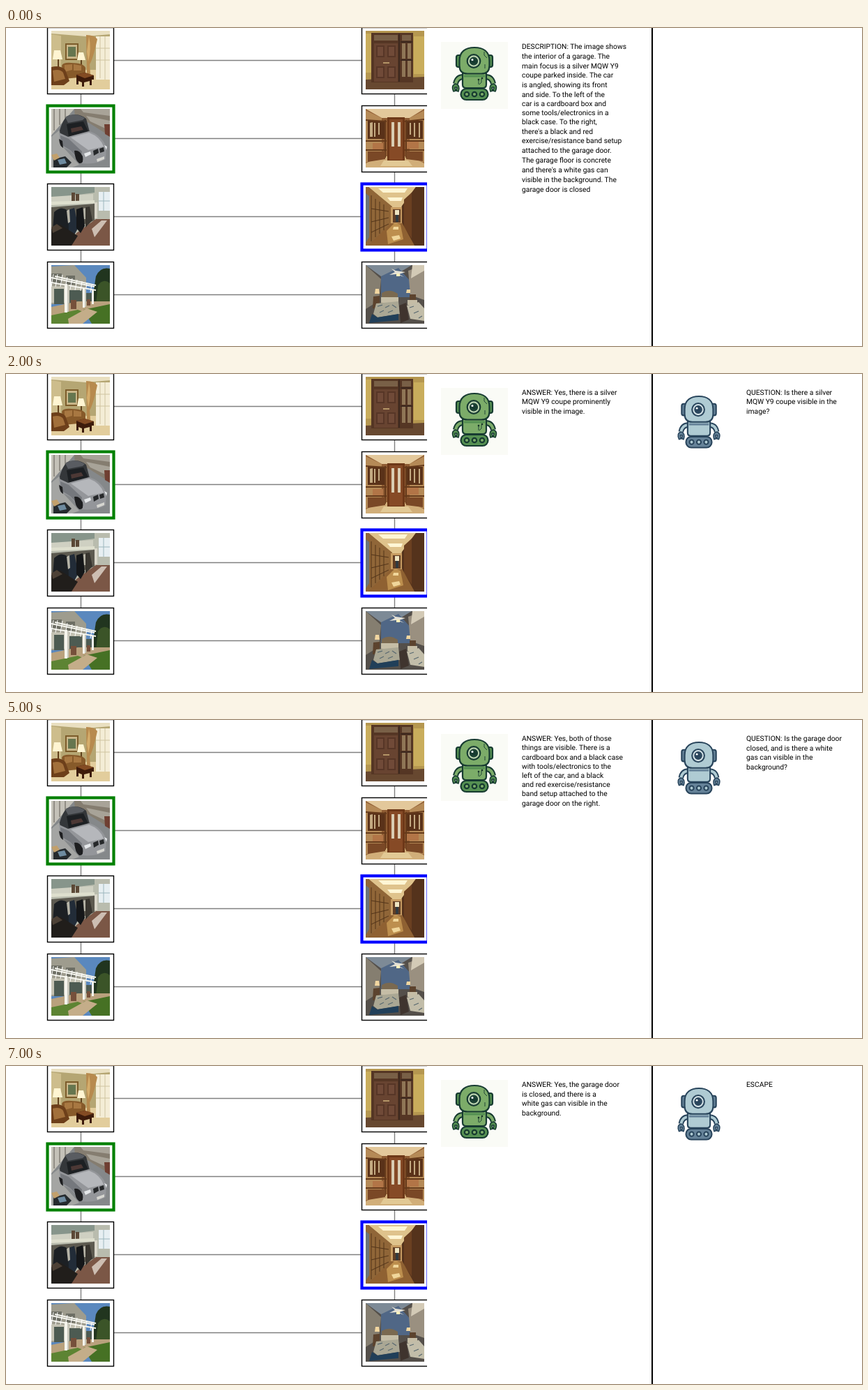
Recreate the animation shown at these times as an HTML page. Size 1228 by 456 pixels, loop 8 s.

```html
<!DOCTYPE html>
<html lang="en">
<head>
<meta charset="utf-8">
<title>Image dialogue</title>
<style>
html, body { margin: 0; width: 100%; height: 100%; overflow: hidden; background: #fff; }
svg { display: block; width: 1228px; height: 456px; }
text { font: 10.3px Roboto, Arial, sans-serif; text-rendering: geometricPrecision; fill: #000; }
</style>
</head>
<body>
<svg id="stage" viewBox="0 0 1228 456" xmlns="http://www.w3.org/2000/svg"></svg>
<script>
const stage = document.getElementById('stage');

// Scene lines: "fill path" or "stroke/width path", in an 84 x 84 square.
const living = `
#b5a673 M0 0H84V84H0Z
#e9dfc0 M0 0H84V5L50 8L0 4Z
#e2cd9c M0 66L40 56H84V84H0Z
#cdbd8c M0 5L14 7V60H0Z
#7c5c2a M20 18H39V42H20Z
#c9b689 M22 20H37V40H22Z
#66764f M24 23H35V37H24Z
#f4edd6 M64 8H84V70H64Z
#cfc4a0/1 M70 8V68M77 8V70M64 25H84M64 42H84
#b78a4e M50 6Q62 6 66 12Q60 40 55 48L56 62H51Z
#d5ad6b M54 8Q58 26 53 44L51 30Z
#fff5d2 M4 28H13L16 41H2Z
#fff5d2 M39 31H46L49 42H37Z
#60401c/2 M10 41V52M43 42V54
#875a2a M15 50Q17 45 29 46Q46 46 49 53V66L18 69Z
#a87842 M19 49L30 48V56L19 59ZM32 48L43 50V57H32Z
#6d3f1a M0 52Q13 49 20 56L26 72L18 78H0Z
#a2703b M2 57Q12 54 17 60L20 69L4 73Z
#3d1b0b M36 63L48 60L61 64V70L58 70V78H55V72L47 74V80H44V74L39 72V77H36Z
#834b23 M36 63L48 60L61 64L48 68Z`;

const garage = `
#85888a M0 0H84V84H0Z
#c4c1b8 M0 0H33L12 24L0 38Z
#857d70 M33 0H84V39L54 20L34 12Z
#a8a398 M42 0H84V10L46 5ZM50 10L84 17V31L56 18Z
#6f3f32 M76 22H84V40L77 36Z
#5f5b52/1 M4 0V31M12 0V23M20 0V16
#a4a5a3 M0 40L11 31L18 56L40 80L30 84H0Z
#34373a M12 31Q18 10 27 9Q41 6 50 14L55 33L24 44L14 46Z
#595c61 M20 12Q34 4 48 13L45 16L24 20Z
#1d2023 M22 22L46 18L53 32L25 40Z
#4c3835 M28 28L43 25L46 30L29 34Z
#94969a M11 34L24 40L54 32Q72 37 79 55L78 72Q66 80 43 78L27 60L13 53Z
#b5b7bb M28 41L54 34Q70 40 75 54L53 59Z
#75787d M13 38L25 43L44 61L42 74L27 59L14 51Z
#1d1e20 M33 60Q40 58 45 68Q47 79 40 78Q34 74 33 60ZM11 43L16 46L17 56Q12 54 11 43Z
#26282a M60 60L67 57L68 63L61 67ZM69 57L75 55L76 61L70 63Z
#e4e7e9 M47 64L56 61L57 65L49 69ZM76 52L80 54L79 59Z
#d6d6d0 M65 72L76 68V72L66 76Z
#252a2e M3 72L20 68L29 77L22 84H3Z
#c2a06c M0 66L8 64L12 70L4 74Z
#6e8ba0 M9 73L19 71L22 78L12 80Z`;

const mudroom = `
#b9bcae M0 0H84V84H0Z
#87958b M0 0H62V8L0 16Z
#cfd0c2 M0 14L60 10V24L0 25Z
#e7eff2 M68 7H84V34H68Z
#9cb6bd/1 M75 7V34M68 20H84
#5b4836 M29 8H34V20H29ZM35 10H40V20H35Z
#dedfce M0 21L62 19V23L0 26Z
#5d5a50 M0 29L62 24V48L0 70Z
#7b5746 M36 66L64 46H84V84H26Z
#cdbeb2 M58 60L72 48H80L62 72Z
#1c2024 M4 36Q14 26 24 34L27 70L16 84H0Z
#222c38 M24 33L33 30L39 58L31 72L25 65Z
#151719 M36 32L45 29L48 56L42 66L36 59Z
#38352f M49 29L55 28L59 48L49 58Z
#b6b4a7 M22 34L26 32L27 50L24 52ZM46 31L49 30V46H47Z
#211e1b M0 60L13 54L38 70L29 84H0Z
#4d4136 M0 58L8 53L16 59L2 66Z
#d9d6c9 M62 22H66V45H62Z`;

const pergola = `
#5a88be M0 0H84V84H0Z
#9e9c8e M0 2L33 0L50 18V56H0Z
#6d6e64 M0 12H15V27H0ZM21 15H34V28H21Z
#c4c2b3 M0 30L42 32V54H0Z
#4d5b52 M4 34H18V56H4ZM26 36H44V56H26ZM50 40H58V55H50Z
#21351f M64 16Q70 2 84 5V57H58L61 35Z
#3b5428 M67 29Q75 18 84 26V55H64Z
#b9a17d M0 60L38 52H84V62L37 75L0 78Z
#5d8433 M0 72L38 64L58 72L36 84H0Z
#467124 M46 64L84 56V84H58Z
#c4ad89 M24 77L51 62L66 67L45 84H25Z
#f5f5ed/2 M0 18L62 31M0 25L64 36M5 16L64 29
#fff/1 M3 13L0 31M9 13L6 31M16 14L13 31M23 17L20 33M30 19L27 35M37 21L34 36M44 23L42 37M51 26L49 38M58 28L56 39
#f5f4ec M19 27H23V68H19ZM45 33H48V61H45ZM58 35H61V56H58Z
#c7c6ba M23 28H25V67H23ZM48 34H50V60H48Z
#76503b M28 50H36V63H28ZM51 49H56V58H51Z`;

const door = `
#b59750 M0 0H84V84H0Z
#c9ad5c M0 4H8V60H0ZM69 8H84V62H69Z
#674830 M0 70L84 66V84H0Z
#553624 M8 3H68V74H8Z
#796047 M12 6H46V14H12ZM52 6H65V14H52Z
#684431 M12 18H46V73H12Z
#573627 M15 21H27V38H15ZM31 21H43V38H31ZM15 51H27V68H15ZM31 51H43V68H31Z
#704a38 M17 23H25V36H17ZM33 23H41V36H33ZM17 53H25V66H17ZM33 53H41V66H33Z
#b49567 M25 45H34V47H25Z
#8f7656 M52 18H57V40H52ZM60 18H65V40H60ZM52 43H57V66H52ZM60 43H65V66H60Z
#3d291f/2 M48 4V73M50 16H67M50 42H67`;

const closet = `
#8f5c33 M0 0H84V84H0Z
#e3c89b M0 0H84L63 13H23Z
#b58a57 M0 2L23 13V70L0 77ZM84 2L63 13V70L84 77Z
#d1ae79 M0 78L22 68H64L84 78V84H0Z
#6d3818 M31 12H56V75H31Z
#864a26 M34 15H53V73H34Z
#dacdb3 M37 19H41V54H37ZM46 19H50V54H46Z
#5a3219 M3 17H28V43H3ZM58 17H82V43H58Z
#c4aa82 M6 20L10 19V40H6ZM12 20H14V40H12ZM18 20H20V37H18ZM63 20H65V37H63ZM69 20H71V40H69ZM76 20H78V41H76Z
#653a1b/2 M0 16L30 18M56 18L84 15M0 46H30M56 46H84M0 59H30M56 59H84M28 16V70M58 16V70
#b27547 M10 49H25V58H10ZM59 47H76V57H59Z
#7a4826 M3 61H28V72L3 76ZM58 61H82V75L58 72Z
#e2c995 M26 74H61L67 82H21Z`;

const corridor = `
#78502b M0 0H84V84H0Z
#dfc38c M4 0H72L51 29H38Z
#fff6d5 M18 2H60L56 8H25ZM31 15H53L51 20H35Z
#906638 M4 0L38 28V51L4 84H0V0Z
#55331c M84 0H72L52 27V52L70 84H84Z
#6b4021 M55 18L66 8V74L55 58Z
#8f6132 M4 84L37 51H52L70 84Z
#bd8f4e M30 63L42 51L50 54L54 75L32 82Z
#f0d69a M37 71L48 69L50 74L40 77ZM40 57H47V61H39Z
#69747c M0 9L5 13V72L0 80Z
#523419/1 M8 12V78M14 17V72M20 21V67M26 25V62M8 31L33 35M8 50L33 44M8 65L33 53
#c79c62 M36 29H52V52H36Z
#603d24 M39 32H50V51H39Z
#eee4c1 M42 33H48V40H42Z
#313a40 M43 40H47V50H43Z`;

const bedroom = `
#544f4a M0 0H84V84H0Z
#857e70 M0 0L22 20L19 51L0 63Z
#7d8a96 M0 0H66L30 22Z
#506786 M22 16L47 4L65 24V46H22Z
#9a9080 M61 8L84 0V50L64 43Z
#d3cab6 M67 0H84V8L65 19Z
#e5e2d6 M43 8L57 10L48 13L55 17L44 13L34 14L42 10L37 5Z
#fff2be M44 12H49V16H44Z
#5c432e M11 45L20 44V62H10ZM63 42H72V52H63Z
#f1d6a0 M14 34H19L20 41H13ZM59 35H64V40H58Z
#7a6950 M23 40Q34 33 46 41V57H22Z
#c5bda6 M22 46H47V54H22ZM60 50H74V57H60Z
#aaa794 M15 55L47 52L49 70L17 75L11 70Z
#c2bda9 M59 58L76 53L84 62V80L64 77Z
#596970/1.3 M17 59L24 57M28 61L34 58M38 57L44 61M20 68L26 65M32 68L39 65M63 61L69 59M69 69L76 66M76 76L81 73
#213f59 M9 70L17 75L47 70V79L5 83Z
#3f342e M48 58L58 54L62 78L50 83Z`;

const answers = [
`DESCRIPTION: The image shows
the interior of a garage. The
main focus is a silver MQW Y9
coupe parked inside. The car
is angled, showing its front
and side. To the left of the
car is a cardboard box and
some tools/electronics in a
black case. To the right,
there's a black and red
exercise/resistance band setup
attached to the garage door.
The garage floor is concrete
and there's a white gas can
visible in the background. The
garage door is closed`,
`ANSWER: Yes, there is a silver
MQW Y9 coupe prominently
visible in the image.`,
`ANSWER: Yes, both of those
things are visible. There is a
cardboard box and a black case
with tools/electronics to the
left of the car, and a black
and red exercise/resistance
band setup attached to the
garage door on the right.`,
`ANSWER: Yes, the garage door
is closed, and there is a
white gas can visible in the
background.`];

const questions = ['',
`QUESTION: Is there a silver
MQW Y9 coupe visible in the
image?`,
`QUESTION: Is there a cardboard
box and some tools/electronics
in a black case to the left of
the car? Also, is there a
black and red
exercise/resistance band setup
attached to the garage door on
the right?`,
`QUESTION: Is the garage door
closed, and is there a white
gas can visible in the
background?`,
'ESCAPE'];

const box = (x, y, color, width) =>
  `<rect x="${x}" y="${y}" width="95" height="95" fill="#fff" stroke="${color}" stroke-width="${width}"/>`;

function photo(x, y, scene) {
  const shapes = scene.trim().split('\n').map(line => {
    const cut = line.indexOf(' ');
    const [color, width] = line.slice(0, cut).split('/');
    const paint = width ? `fill="none" stroke="${color}" stroke-width="${width}"` : `fill="${color}"`;
    return `<path d="${line.slice(cut + 1)}" ${paint}/>`;
  });
  return `<svg x="${x}" y="${y}" width="84" height="84" viewBox="0 0 84 84">${shapes.join('')}</svg>`;
}

function column(x, wire, scenes, marked, color) {
  return `<path d="M${wire} 46V382" stroke="#808080" stroke-width="1.4"/>` +
    scenes.map((scene, i) => {
      const y = i * 112 - 0.5;
      const frame = i === marked ? box(x, y, color, 4.2) : box(x, y, '#000', 1.4);
      return frame + photo(x + 5.5, y + 4.5, scene);
    }).join('');
}

function robot(x, y, sx, sy, [light, mid, dark, eye], details = '') {
  const arm = 'M-16 43Q-25 43 -27 53';
  const claw = 'M-30 64Q-34 55 -27 53Q-20 55 -23 64L-26 63L-25 58H-28L-27 63Z';
  const limb = `<path d="${arm}" fill="none" stroke="${dark}" stroke-width="8"/>
    <path d="${arm}" fill="none" stroke="${light}" stroke-width="4"/><path d="${claw}" fill="${mid}" stroke-width="1.6"/>`;
  const wheels = [-11, 0, 11].map(cx => `<circle cx="${cx}" cy="68" r="3.2" fill="${light}"/>`).join('');
  return `<g transform="translate(${x} ${y}) scale(${sx} ${sy})" stroke="${dark}" stroke-width="2.2" stroke-linejoin="round">
    ${limb}<g transform="scale(-1 1)">${limb}</g>
    <path d="M-17 38H17V54Q17 59 12 59H-12Q-17 59 -17 54Z" fill="${light}"/>
    <path d="M-15 42H15" stroke="${mid}" stroke-width="3"/>
    <rect x="-26" y="12" width="8" height="17" rx="3" fill="${mid}"/>
    <rect x="18" y="12" width="8" height="17" rx="3" fill="${mid}"/>
    <path d="M-21.5 20C-21.5 7 -13 1 0 1S21.5 7 21.5 20V27Q21.5 38.5 10 38.5H-10Q-21.5 38.5 -21.5 27Z" fill="${light}"/>
    <circle cx="-1" cy="20.5" r="9.3" fill="${eye}"/>
    <circle cx="-1" cy="20.5" r="5" fill="${mid}"/>
    <circle cx="-1" cy="20.5" r="3" fill="${dark}"/>
    <circle cx="-3" cy="18.5" r="1.5" fill="#fff" stroke="none"/>
    <rect x="-19.5" y="60" width="39" height="16" rx="8" fill="${mid}"/>
    ${wheels}${details}</g>`;
}

const circuit = `<path d="M14 7V12L18 16M15 25V31M6 48V54M10 46V51L7 54" fill="none" stroke-width=".9"/>
  <circle cx="6" cy="47" r="1" stroke-width=".8"/><circle cx="11" cy="45" r="1" stroke-width=".8"/>`;

stage.innerHTML = `
  <clipPath id="left"><rect width="604" height="456"/></clipPath>
  <g clip-path="url(#left)">
    <path d="M155 46.5H510M155 158.5H510M155 270.5H510M155 382.5H510" stroke="#808080" stroke-width="1.4"/>
    ${column(59.5, 107.5, [living, garage, mudroom, pergola], 1, '#008000')}
    ${column(510.5, 557.5, [door, closet, corridor, bedroom], 2, '#00f')}
  </g>
  <path d="M624 20H720V116H624Z" fill="#fafbf6"/>
  ${robot(672, 27, 1, 1, ['#7cac69', '#559052', '#173b31', '#bad2ae'], circuit)}
  <g id="asker">${robot(994, 31, .95, .98, ['#afcbd3', '#668399', '#29455c', '#d5e3e7'])}</g>
  <path d="M927 0V456" stroke="#000" stroke-width="2"/>
  <g id="answer"></g><g id="question"></g>`;

const [asker, answer, question] = ['asker', 'answer', 'question'].map(id => document.getElementById(id));

// Lines with descenders take one pixel more.
function paragraph(x, copy) {
  let y = 30;
  return copy.split('\n').map(line => {
    const row = `<text x="${x}" y="${y}">${line}</text>`;
    y += /[gjpqy]/.test(line) ? 14 : 13;
    return row;
  }).join('');
}

let shown = -1;

function draw(time) {
  const step = Math.floor(time / 1000) % 8;
  if (step === shown) return;
  shown = step;
  asker.style.display = step ? '' : 'none';
  answer.innerHTML = paragraph(740, answers[step >> 1]);
  question.innerHTML = paragraph(1062, questions[(step + 1) >> 1]);
}

const start = performance.now();

function tick() {
  draw(performance.now() - start);
  requestAnimationFrame(tick);
}

tick();
</script>
</body>
</html>
```
